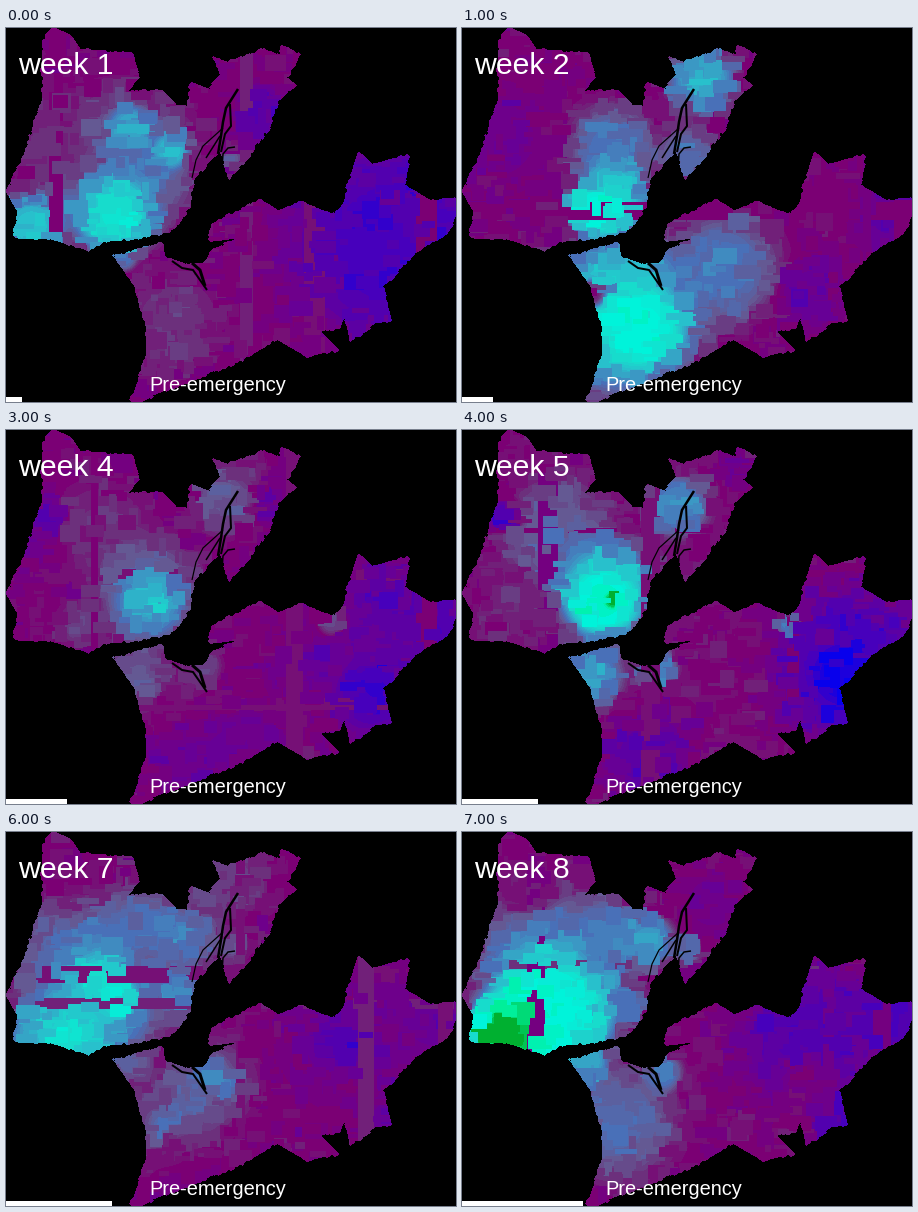
A matplotlib script that plays this animation: 450 by 374 pixels, repeating every 8000 ms.

```python
import numpy as np
import matplotlib.pyplot as plt
from matplotlib.animation import FuncAnimation
from matplotlib.colors import LinearSegmentedColormap
from matplotlib.patches import Rectangle
from matplotlib.path import Path

W, H, DPI = 450, 374, 100
WEEKS = 8
TOP = 12  # highest colour level

# Colour ramp, level 0 to 12
RAMP = ["#0800ec", "#4800bc", "#680096", "#7c0074", "#6c307c", "#645a94",
        "#4a70b8", "#3c98c4", "#28c0cc", "#18dccc", "#00f4dc", "#00f09c",
        "#00b030"]
cmap = LinearSegmentedColormap.from_list("levels", RAMP)
cmap.set_bad("black")

# Key points of the two coastlines
NORTH = [
    (38, 12), (48, 0), (66, 9), (74, 22), (127, 26), (133, 50), (121, 64),
    (155, 62), (172, 79), (182, 79), (185, 55), (203, 61), (215, 47),
    (208, 30), (222, 35), (258, 21), (272, 28), (276, 18), (294, 26),
    (280, 50), (290, 57), (273, 71), (262, 102), (236, 136), (223, 151),
    (214, 122), (187, 151), (184, 178), (168, 202), (130, 211), (100, 212),
    (82, 222), (46, 211), (9, 209), (12, 183), (1, 164), (18, 127), (37, 70)]
SOUTH = [
    (108, 228), (157, 215), (158, 230), (184, 237), (197, 236), (206, 222),
    (232, 210), (203, 213), (206, 196), (255, 172), (272, 183), (295, 174),
    (326, 187), (335, 181), (353, 124), (366, 137), (403, 127), (398, 157),
    (425, 173), (450, 171), (450, 188), (440, 208), (412, 222), (377, 259),
    (385, 293), (370, 294), (345, 314), (338, 287), (333, 300), (314, 304),
    (333, 322), (300, 328), (271, 311), (236, 332), (195, 349), (150, 366),
    (135, 374), (125, 373), (141, 325), (141, 300), (129, 258)]

yy, xx = np.mgrid[0:H, 0:W]


def land_mask():
    """Both coasts, slightly ragged, with the pixels they touch."""
    rng = np.random.default_rng(4)
    pixels = np.column_stack([xx.ravel() + .5, yy.ravel() + .5])
    wobble = rng.normal(0, .6, (H // 4 + 1, W // 4 + 1))
    wobble = np.kron(wobble, np.ones((4, 4)))[:H, :W].ravel()
    pixels += wobble[:, None]
    mask = np.zeros((H, W), bool)
    for coast in (NORTH, SOUTH):
        mask |= Path(coast).contains_points(pixels).reshape(H, W)
    grown = np.pad(mask, 1)
    return (mask | grown[:-2, 1:-1] | grown[2:, 1:-1]
            | grown[1:-1, :-2] | grown[1:-1, 2:])


def surface(base, *spots):
    """Even ground with soft-edged spots (x, y, radius, level) laid over."""
    field = np.full((H, W), float(base))
    for x, y, r, level in spots:
        d2 = ((xx - x) ** 2 + (yy - y) ** 2) / r ** 2
        field += (level - field) * np.exp(-d2 ** 2)
    return field


def blocks(field, seed):
    """Break a smooth surface into overlapping flat rectangles."""
    rng = np.random.default_rng(seed)
    out = field.copy()
    for _ in range(1500):
        w, h = rng.integers(7, 25), rng.integers(5, 19)
        x, y = rng.integers(-9, W - 9), rng.integers(-9, H - 9)
        cx, cy = min(max(x + w // 2, 0), W - 1), min(max(y + h // 2, 0), H - 1)
        out[max(y, 0):y + h, max(x, 0):x + w] = (
            field[cy, cx] + rng.normal(0, .3))
    return np.clip(np.round(out * 3) / 3, 0, TOP)


fields = {
    1: surface(3, (115, 140, 72, 6), (50, 110, 48, 3.8), (25, 198, 35, 8),
               (108, 188, 40, 9.2), (124, 98, 20, 7.5), (165, 122, 18, 8),
               (255, 85, 30, 1.5), (225, 130, 12, 5), (165, 295, 50, 4),
               (118, 230, 12, 6), (385, 215, 105, 1)),
    2: surface(3, (35, 110, 55, 2.4), (150, 120, 45, 6), (150, 170, 38, 8.5),
               (132, 183, 26, 10), (240, 50, 35, 7.5), (225, 125, 30, 5.5),
               (160, 285, 80, 8.8), (130, 265, 14, 3.5), (180, 300, 38, 10),
               (260, 240, 55, 6), (350, 265, 35, 2), (425, 190, 35, 1.8)),
    3: surface(2.6, (40, 110, 32, 1.2), (150, 185, 38, 4), (75, 195, 22, 5.5),
               (145, 165, 20, 6), (230, 45, 40, 4), (262, 75, 18, 1),
               (165, 270, 40, 3.5), (250, 310, 35, 1.4), (370, 150, 35, 1),
               (430, 190, 32, .9), (360, 270, 32, 1), (290, 240, 30, 1.7)),
    5: surface(3.2, (95, 105, 55, 5.2), (42, 85, 18, 1.2), (50, 180, 38, 3.6),
               (145, 160, 52, 8), (140, 170, 34, 10.3), (150, 170, 8, 12),
               (215, 75, 32, 6.5), (280, 35, 25, 2.5), (125, 245, 35, 7),
               (195, 235, 20, 6.5), (185, 325, 50, 1.7), (390, 235, 85, 1),
               (380, 245, 28, .2), (325, 192, 14, 6.3)),
    6: surface(3, (70, 120, 62, 5.5), (145, 100, 50, 6), (140, 135, 24, 4),
               (98, 145, 26, 8), (110, 168, 20, 9), (75, 200, 38, 6.5),
               (30, 170, 28, 4), (180, 160, 28, 7.5), (225, 60, 45, 6),
               (245, 100, 25, 3.5), (205, 250, 45, 6.2), (222, 253, 14, 9),
               (160, 290, 18, 6), (145, 262, 20, 3.2), (170, 335, 32, 1.5),
               (335, 210, 32, 1.1)),
    8: surface(3, (85, 130, 75, 6.3), (95, 175, 65, 9), (150, 105, 40, 6.2),
               (85, 180, 50, 10), (40, 207, 42, 12), (165, 168, 18, 6),
               (188, 108, 25, 7), (65, 50, 34, 3.2), (250, 70, 35, 2.4),
               (225, 118, 14, 6), (155, 290, 58, 5.6), (125, 230, 20, 7.5),
               (200, 240, 20, 6.3), (350, 200, 75, 1.4), (430, 190, 35, 1.1),
               (375, 285, 25, 1), (345, 255, 28, 2.7)),
}
fields[4] = (fields[3] + fields[5]) / 2
fields[7] = (fields[6] + fields[8]) / 2

land = land_mask()
maps = [np.ma.masked_array(blocks(fields[k], k), ~land)
        for k in range(1, WEEKS + 1)]

fig = plt.figure(figsize=(W / DPI, H / DPI), dpi=DPI, facecolor="black")
ax = fig.add_axes([0, 0, 1, 1])
ax.axis("off")
image = ax.imshow(maps[0], cmap=cmap, vmin=0, vmax=TOP, aspect="auto",
                  extent=(0, W, H, 0), interpolation="nearest")
ax.set_xlim(0, W)
ax.set_ylim(H, 0)


def water(width, *points):
    ax.plot(*zip(*points), color="black", lw=width * 72 / DPI,
            solid_joinstyle="miter", solid_capstyle="butt")


# River arms, then the inlets of the south shore
water(2.5, (232, 61), (220, 80), (217, 94), (215, 108), (212, 126))
water(2, (224, 76), (225, 98), (219, 106), (215, 124))
water(1.2, (217, 100), (197, 118), (190, 132), (186, 150))
water(1.5, (214, 108), (200, 130))
water(1.5, (216, 140), (217, 126), (222, 120), (229, 119))
water(2, (166, 233), (176, 240), (187, 242), (201, 262))
water(3, (186, 235), (194, 242), (199, 258))


def label(x, y, text, px):
    return ax.text(x, y, text, color="white", family="Liberation Sans",
                   size=px * 72 / DPI, va="baseline", ha="left")


title = label(12.5, 46, "week 1", 30.3)
label(143.5, 363, "Pre-emergency", 20)
bar = Rectangle((0, 369), 16, 5, fc="white", ec="none")
ax.add_patch(bar)


def update(i):
    image.set_data(maps[i])
    title.set_text(f"week {i + 1}")
    bar.set_width(15 * (i + 1) + 1)
    return image, title, bar


anim = FuncAnimation(fig, update, frames=WEEKS, interval=1000, repeat=True)
plt.show()
```
